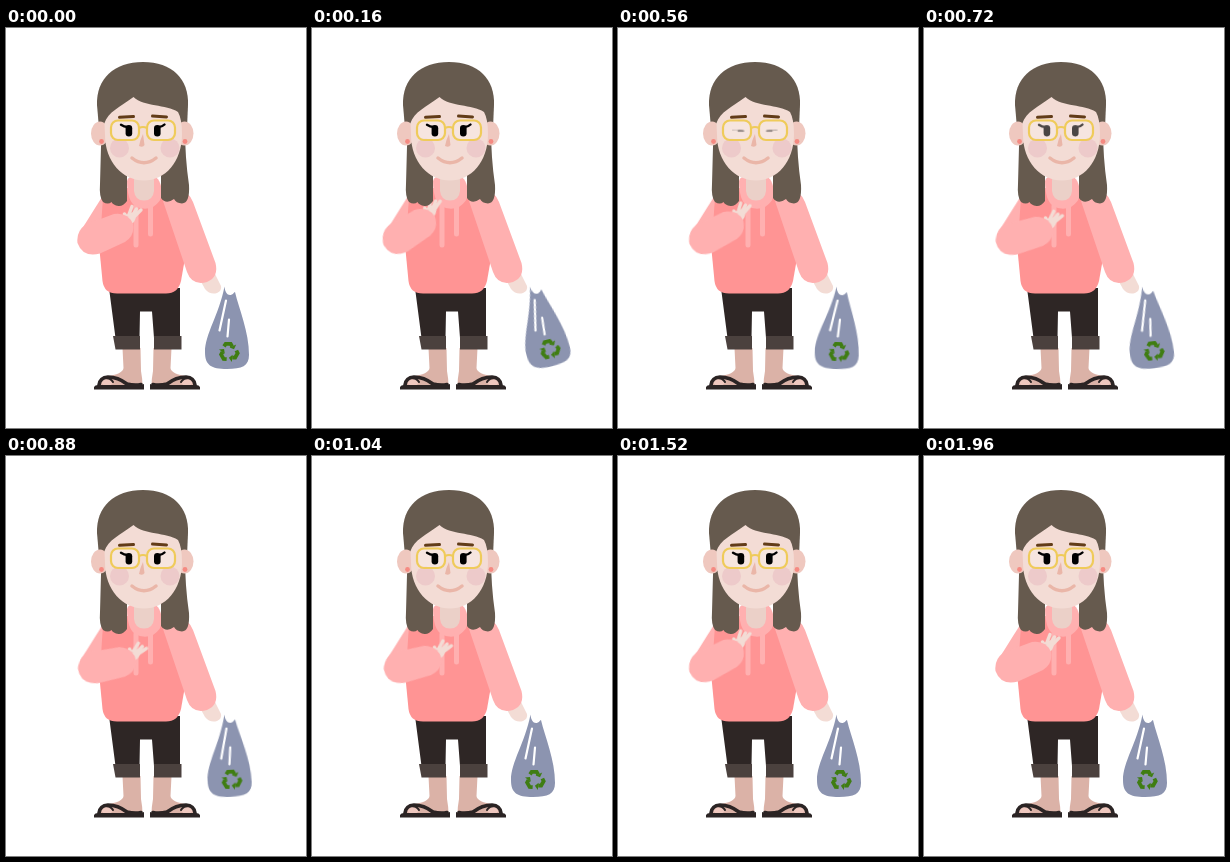
An HTML page for the animation above (2 s loop, 300 px wide and 400 px high).

```html
<!DOCTYPE html>
<html lang="en">
<head>
<meta charset="utf-8">
<title>Shopper with a reusable bag</title>
<style>
  html, body { margin: 0; width: 100%; height: 100%; overflow: hidden; background: #fff; }
  svg { display: block; width: 100%; height: 100%; }
  .line { fill: none; stroke-linecap: round; stroke-linejoin: round; }
  .skin { fill: #f3dcd5; }
  .leg { fill: #dbb2a7; }
  .hair { fill: #665a4e; }
  .top { fill: #ff9494; }
  .sleeve { fill: #ffb0b0; }
  .dark { fill: #2e2625; }
  .cuff { fill: #4b413e; }
  #bag { transform-origin: 219px 261px; }
  #forearm { transform-origin: 87px 211px; }
  .eye { transform-box: view-box; transform-origin: 137px 103px; }
</style>
</head>
<body>
<svg viewBox="0 0 300 400">
  <defs>
    <g id="foot">
      <path class="leg" d="M116.500 320H134.500L135 343Q136.500 351 136.500 358H94Q92 350 100 348.500Q117 346 117.500 340Z"/>
      <ellipse cx="101" cy="353.500" rx="6.500" ry="4" fill="#efc8bf"/>
      <path class="line" d="M93 357Q94 349.500 102 349Q112 349 121 356Q129 358 135 356.500" stroke="#2b2424" stroke-width="3.600"/>
      <path class="line" d="M98 350Q105 350 107 354" stroke="#2b2424" stroke-width="2"/>
      <path d="M88 361.500V359Q89 357 92 357H135L138 356V361.500Z" fill="#2b2424"/>
    </g>
    <g id="arrow">
      <path d="M-5-5.600L-3.300-8.100H1.700L3.200-5.600" fill="none" stroke="#3f7d12" stroke-width="3.800"/>
      <path d="M.6-4.500L7.200-7.400L5-2.800Z" fill="#3f7d12"/>
    </g>
  </defs>

  <!-- legs -->
  <use href="#foot"/>
  <use href="#foot" transform="matrix(-1 0 0 1 282 0)"/>
  <path class="dark" d="M103 260H174V310H148L146 283.500H134L133.500 310H109.500Z"/>
  <path class="cuff" d="M107 308H134V321.500H109.500Z"/>
  <path class="cuff" d="M148 308H175.500V321.500H148Z"/>

  <!-- bag and right hand -->
  <path class="skin" d="M193 250L209 246L215 258Q216 263 211 265Q204 267 199 261Z"/>
  <g id="bag">
    <path d="M218.500 258.500C219 264 221 267 224 267C227 267 227.500 264.500 229 264C233 281 243 304 243 327C243 338 236 341 221 341C205 341 199 337 199 324C199 306 213 287 218.500 258.500Z" fill="#8c94b0"/>
    <path class="line" d="M220 272.500L213.500 302.500M223 291.500L221.500 308.500" stroke="#fff" stroke-width="2.200"/>
    <g transform="translate(223 324)">
      <use href="#arrow"/>
      <use href="#arrow" transform="rotate(120)"/>
      <use href="#arrow" transform="rotate(240)"/>
    </g>
  </g>

  <!-- body -->
  <path id="upper" class="sleeve" d="M96 169Q103 162 112 168L104 215L74 204Z"/>
  <path class="top" d="M97 169Q106 160 122 160H156Q172 162 178 172L178.500 233L175 253Q172 265.500 160 265.500H111Q98 265.500 96.500 253L93.500 222Z"/>
  <path class="sleeve" d="M157 173Q161 164 172 163Q183 163 187 174L209.500 235Q213 249 201 254Q186 258 181 244Z"/>
  <path class="sleeve" d="M121 153Q122 148 130 148H147Q155 150 156 165Q156 173 147 179Q138 183 129 178Q121 172 121 153Z"/>
  <path class="line" d="M130 178V217M144.500 178V206" stroke="#ffb0b0" stroke-width="5"/>
  <path d="M128 146H148V163Q147 172.500 138 172.500Q129 172.500 128 163Z" fill="#ebd0c8"/>

  <g id="forearm">
    <ellipse class="skin" cx="124" cy="191" rx="5" ry="7" transform="rotate(35 124 191)"/>
    <path class="line" d="M122 189L126 178.500M125 190L130.500 181M126 191L135 182M121 190L118.500 186" stroke="#f3dcd5" stroke-width="3.400"/>
    <path class="sleeve" d="M80 196.500L108 186Q122 184 127 196Q129 208 119 214L94 225.500Q77 230 71.500 215Q70 203 80 196.500Z"/>
  </g>

  <!-- head -->
  <path class="hair" d="M95.500 100H121V173Q117 178.500 112.500 178Q107 177 105.500 174Q102 177 97 174Q93 169 94 156Z"/>
  <path class="hair" d="M155 100H179Q179 130 183 157Q184 175 176 175.500Q170 175 168 171Q160 177 155 170Z"/>
  <path class="hair" d="M91 77C90 51 108 34 137 34S183 51 182 77L181 100H93Z"/>
  <ellipse cx="94" cy="105.500" rx="9" ry="12" fill="#efc8bf"/>
  <ellipse cx="178.500" cy="105.500" rx="9" ry="12" fill="#efc8bf"/>
  <circle cx="95.500" cy="113.500" r="2.400" fill="#f58a82"/>
  <circle cx="179" cy="113.500" r="2.400" fill="#f58a82"/>
  <path class="skin" d="M127.500 69C138 79 160 76 172 84Q176 91 176 106C176 134 159 152.500 138 152.500S99 134 99 107L98.500 95C102 84 114 79 127.500 69Z"/>
  <circle cx="113.500" cy="120" r="9.500" fill="#edcaca"/>
  <circle cx="164" cy="120" r="9.500" fill="#edcaca"/>
  <path d="M137 106L138.500 117Q137 120 133 118Q134 112 137 106Z" fill="#eab6a8"/>
  <path class="line" d="M126 130Q138 139.500 150 130" stroke="#eab6a8" stroke-width="3.500"/>
  <path class="line" d="M113.500 89.300L127.500 88.500M146.500 88L160.500 89" stroke="#623c18" stroke-width="3"/>
  <g class="line" stroke="#efcb5a" stroke-width="2.200">
    <rect x="105" y="92.500" width="28" height="19.500" rx="7" fill="#fff" fill-opacity=".25"/>
    <rect x="141" y="92.500" width="28" height="19.500" rx="7" fill="#fff" fill-opacity=".25"/>
    <path d="M133 100Q137 98 141 100"/>
  </g>
  <g class="eye">
    <rect x="119.600" y="97" width="6.600" height="11.500" rx="3.300"/>
    <rect x="148" y="97" width="6.600" height="11.500" rx="3.300"/>
    <path class="line" d="M121.500 99Q118 99 115 96.800M153 99Q156 99 158.500 96.500" stroke="#000" stroke-width="2.300"/>
  </g>
</svg>
<script>
  const LOOP = 2000;

  // Each step: time in ms, value, easing towards the next step.
  function run(selector, steps, pose) {
    const frames = steps.map(([time, value, easing = 'ease-in-out']) =>
      ({ offset: time / LOOP, easing, ...pose(value) }));
    document.querySelector(selector).animate(frames, { duration: LOOP, iterations: Infinity });
  }

  const swing = 'cubic-bezier(.37, 0, .63, 1)';
  run('#bag',
    [[0, 0], [140, -14, swing], [430, 8, swing], [720, -6.2, swing], [1000, 0], [LOOP, 0]],
    deg => ({ transform: `rotate(${deg}deg)` }));

  const wave = [[0, 0, 'ease-out'], [320, -15, swing], [880, 11, swing], [1480, -5, swing], [LOOP, 0]];
  run('#forearm', wave,
    deg => ({ transform: `translate(${deg * .08}px, ${deg * .06}px) rotate(${deg}deg)` }));
  run('#upper', wave, deg => ({ transform: `translateX(${deg * .05}px)` }));

  // Openness of the eyes: 1 open, 0 shut.
  run('.eye',
    [[0, 1], [240, 1, 'linear'], [320, .45, 'linear'], [440, 0], [560, 0, 'linear'],
     [720, .45, 'linear'], [800, 1], [LOOP, 1]],
    open => ({
      opacity: .45 + .55 * open,
      transform: `scaleY(${.17 + .83 * Math.min(1, open * 2.2)})`
    }));
</script>
</body>
</html>
```
